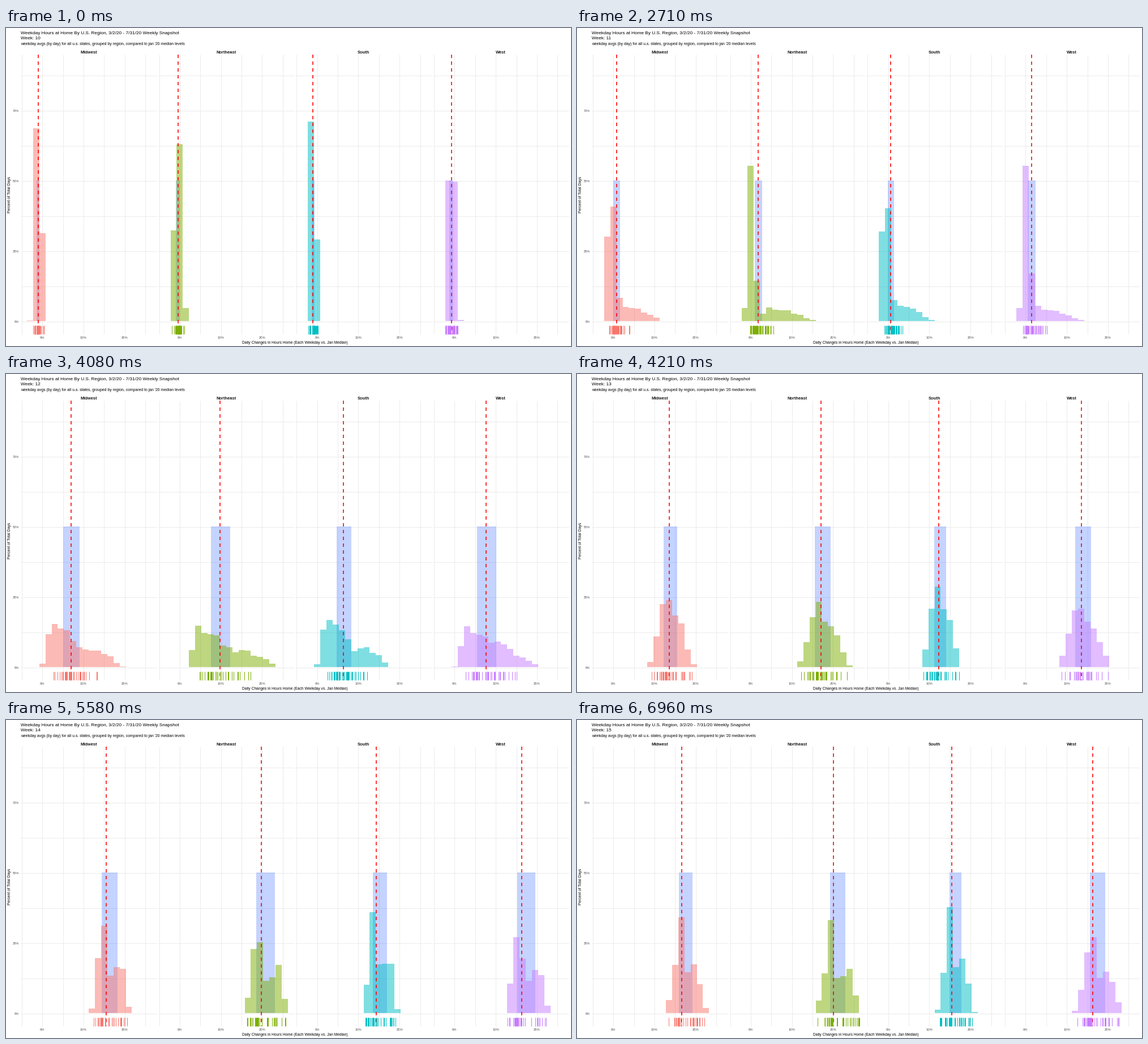
These frames come from a looping animation (998 by 561 pixels, 8000 ms). A matplotlib script:

```python
import matplotlib.pyplot as plt
import numpy as np
from matplotlib.animation import FuncAnimation
from matplotlib.collections import LineCollection
from matplotlib.patches import Rectangle

W, H, DPI = 998, 561, 64
PT = 72 / DPI                       # points per pixel
LOOP, TICK = 8000, 20               # ms
FPS, CYCLE, STEPS = 24, 33, 4       # beats per second, beats per week, tween beats
FIRST_WEEK = 10

LEFT, PITCH, PANEL_W = 26, 242.75, 240
TOP, BOTTOM, BASE = 47, 540, 517.2
X0, X_UNIT, Y_UNIT = 64.2, 7.275, 4.96   # pixels per percent
EDGES = np.arange(-3.75, 27, 1.5)
RUG_SIZE = 36

# Weekly spread: median to quartiles, then tails as multiples of that box
SHAPES = [(0.45, 0.35, 1.1, 1.3), (0.4, 0.45, 0.6, 2.0),
          (2.1, 2.25, 0.55, 1.1), (1.4, 2.1, 0.85, 1.05),
          (1.1, 2.95, 0.5, 0.6), (0.7, 2.7, 0.8, 0.9)]
# Name, colour, spread, weekly medians
REGIONS = [
    ("Midwest", "#F8766D", 0.95, (-1.0, -0.6, 4.73, 13.54, 15.5, 16.65)),
    ("Northeast", "#7CAE00", 1.1, (-0.4, 0.0, 7.3, 17.06, 19.8, 20.05)),
    ("South", "#00BFC4", 0.85, (-1.0, -0.65, 4.37, 12.34, 14.4, 15.45)),
    ("West", "#C77CFF", 1.1, (-0.75, 0.0, 5.63, 13.6, 16.35, 16.35)),
]
CDF = [0, 0.07, 0.25, 0.5, 0.75, 0.93, 1]   # tails thin out half-way
rng = np.random.default_rng(20)

fig = plt.figure(figsize=(W / DPI, H / DPI), dpi=DPI, facecolor="white")
ax = fig.add_axes([0, 0, 1, 1])
ax.axis("off")


def put(x, y, s, size, color="black", **kw):
    return ax.text(x, y, s, fontsize=size * PT, color=color,
                   family="Liberation Sans", **kw)


def y_px(pct):
    return BASE - pct * Y_UNIT


def mix(a, b, f):
    return a + (b - a) * f


def quantiles(median, spread, shape):
    """Values at the CDF levels."""
    below, above, low, high = np.array(shape) * spread
    box = below + above
    low, high = shape[2] * box, shape[3] * box
    q1, q3 = median - below, median + above
    return np.array([q1 - low, q1 - low / 2, q1, median,
                     q3, q3 + high / 2, q3 + high])


class Panel:
    def __init__(self, i, name, color, spread, medians):
        self.zero = X0 + i * PITCH
        left = LEFT + i * PITCH
        dists = [quantiles(m, spread, s) for m, s in zip(medians, SHAPES)]
        self.shares = [100 * np.diff(np.interp(EDGES, q, CDF)) for q in dists]
        self.boxes = [self.x_px(q[2:5]) for q in dists]
        self.days = [self.x_px(np.interp(self.levels(), CDF, q))
                     for q in dists]

        grid = [[(left, y_px(p) + 0.5), (left + PANEL_W, y_px(p) + 0.5)]
                for p in np.arange(0, 90, 12.5)]
        grid += [[(self.x_px(p), TOP), (self.x_px(p), BOTTOM)]
                 for p in range(-5, 30, 5)]
        ax.add_collection(LineCollection(grid, colors="#EBEBEB",
                                         linewidths=PT, zorder=1))
        put(left + PANEL_W / 2, 45, name, 7.5, "#1A1A1A",
            weight="bold", ha="center")
        for p in (0, 10, 20):
            put(self.x_px(p), 548, f"{p}%", 5.9, "#4D4D4D", ha="center")

        self.band = ax.add_patch(Rectangle(
            (0, y_px(50)), 1, BASE - y_px(50), fc="#4876FF", alpha=0.32,
            lw=0, antialiased=False, zorder=2))
        self.bars = ax.stairs(
            y_px(self.shares[0]), self.x_px(EDGES), baseline=BASE, fill=True,
            color=color, alpha=0.5, lw=0, antialiased=False, zorder=3)
        self.line, = ax.plot([0, 0], [TOP, BOTTOM], color="red", lw=1.6 * PT,
                             ls=(0, (3.75, 3.75)), zorder=4)
        self.rug = ax.add_collection(LineCollection(
            [], colors=color, linewidths=PT, zorder=5))

    @staticmethod
    def levels():
        inner = np.sort(rng.uniform(0, 1, RUG_SIZE - 2))
        return np.concatenate([[0], inner, [1]])

    def x_px(self, pct):
        return self.zero + pct * X_UNIT

    def show(self, a, b, f):
        self.bars.set_data(values=y_px(mix(self.shares[a], self.shares[b], f)))
        lo, mid, hi = mix(self.boxes[a], self.boxes[b], f)
        self.band.set_x(lo)
        self.band.set_width(hi - lo)
        self.line.set_xdata([mid, mid])
        days = mix(self.days[a], self.days[b], f)
        self.rug.set_segments([[(x, BOTTOM - 15), (x, BOTTOM)] for x in days])


panels = [Panel(i, *region) for i, region in enumerate(REGIONS)]
ax.set(xlim=(0, W), ylim=(H, 0))

put(LEFT, 10.7, "Weekday Hours at Home By U.S. Region, "
    "3/2/20 - 7/31/20 Weekly Snapshot", 8.22)
week = put(LEFT, 19.6, "", 8.22)
put(LEFT, 30, "weekday avgs (by day) for all u.s. states, grouped by region, "
    "compared to jan '20 median levels", 6.85)
for p in (0, 25, 50, 75):
    put(23.3, y_px(p) + 2.6, f"{p}%", 5.8, "#4D4D4D", ha="right")
put(510.5, 556.7, "Daily Changes in Hours Home (Each Weekday vs. Jan Median)",
    6.66, ha="center")
put(7, 294, "Percent of Total Days", 6.8, rotation=90,
    ha="center", va="center")


def update(i):
    # sample late in the tick so that a new beat is never missed
    beat = int((i * TICK + 15) * FPS / 1000)
    now, r = divmod(beat + 1, CYCLE)
    before = max(now - 1, 0)
    f = min(1, (r + 1) / STEPS)
    for p in panels:
        p.show(before, now, f)
    week.set_text(f"Week: {FIRST_WEEK + (now if f > 0.5 else before)}")


anim = FuncAnimation(fig, update, frames=LOOP // TICK, interval=TICK,
                     init_func=lambda: update(0), repeat=True, repeat_delay=0)
plt.show()
```
